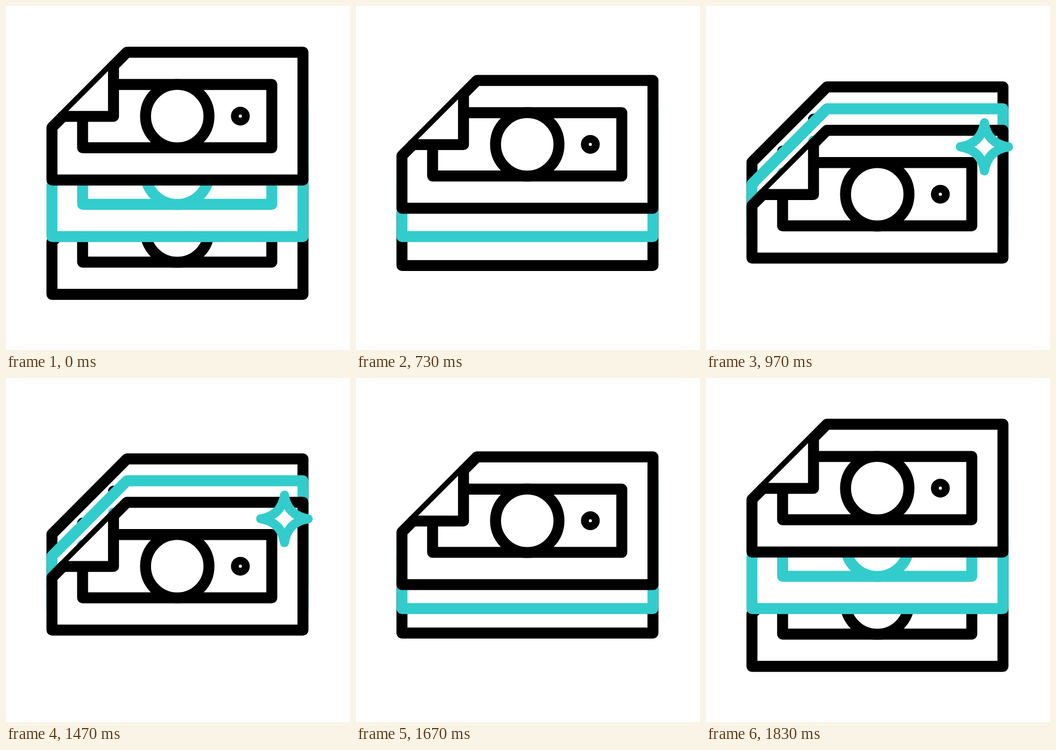
Write an HTML page that moves like this. It is 640 by 640 pixels and loops after 2.5 s.

```html
<!DOCTYPE html>
<html lang="en">
<head>
<meta charset="utf-8">
<title>Banknotes</title>
<style>
  html, body { margin: 0; width: 100%; height: 100%; overflow: hidden; background: #fff; }
  svg { display: block; width: 100%; height: 100%; }
</style>
</head>
<body>
<svg viewBox="0 0 640 640">
  <defs>
    <g id="note" fill="#fff" stroke-width="20.4">
      <path d="M225 86H552.5V323.7H85.5V226Z"/>
      <path fill="none" d="M200 146H494.5V263.7H142.5V205.5"/>
      <circle cx="318.6" cy="204.9" r="59"/>
      <circle cx="436" cy="204.9" r="10.2" stroke-width="14.6"/>
    </g>
  </defs>
  <g stroke-linecap="round" stroke-linejoin="round">
    <use id="back" href="#note" stroke="#000"/>
    <use href="#note" stroke="#3cc" transform="translate(0 105.3)"/>
    <g id="front" stroke="#000">
      <use href="#note"/>
      <path d="M200 111V205.4H105.5" fill="#fff" stroke-width="20.4"/>
    </g>
    <path id="star" fill="#fff" stroke="#3cc" stroke-width="17"
      d="M0-44.7Q5.8-5.8 44.7 0Q5.8 5.8 0 44.7Q-5.8 5.8-44.7 0Q-5.8-5.8 0-44.7Z"/>
  </g>
</svg>
<script>
const LOOP = 2500, STEP = 100 / 3;
const [back, front, star] = ['back', 'front', 'star'].map(id => document.getElementById(id));

const ease = (t, start, length) => {
  const x = Math.min(1, Math.max(0, (t - start) / length));
  return x * x * (3 - 2 * x);
};
const mix = (a, b, p) => a + (b - a) * p;
const shift = (el, y) => el.setAttribute('transform', `translate(0 ${y.toFixed(2)})`);

function draw(ms) {
  // motion advances at 30 steps per second
  const t = Math.floor((ms % LOOP + 3.4) / STEP) * STEP;
  const swap = ease(t, 574, 392) - ease(t, 1463, 367);
  const glow = ease(t, 766, 200) - ease(t, 1453.5, 200);
  shift(front, mix(0, 145.3, swap));
  shift(back, mix(212.8, 64.5, swap));
  star.setAttribute('transform', `translate(518 262) scale(${glow.toFixed(4)})`);
  star.style.display = glow > 0.001 ? '' : 'none';
}

const begin = performance.now();
function tick() {
  draw(performance.now() - begin);
  requestAnimationFrame(tick);
}
tick();
</script>
</body>
</html>
```
